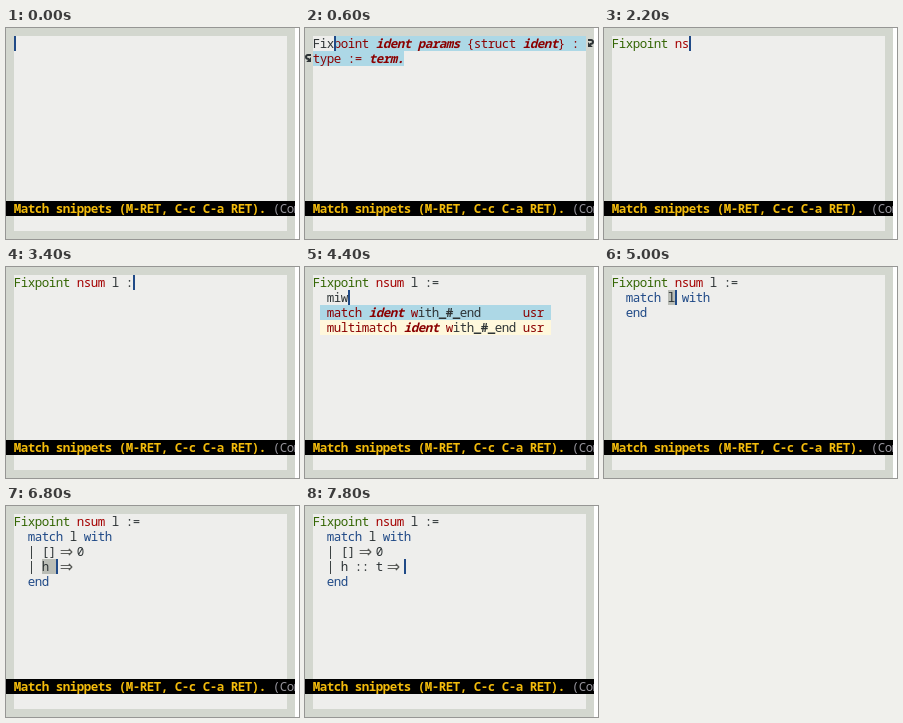
Animation, 293 px wide and 211 px high, one loop 8 s. Source, as an HTML page with a canvas:

```html
<!DOCTYPE html>
<html>
<head>
<meta charset="utf-8">
<style>
html, body { margin: 0; width: 100%; height: 100%; overflow: hidden; background: #fff; }
canvas { display: block; width: 293px; height: 211px; }
</style>
</head>
<body>
<canvas id="stage"></canvas>
<script>
const W = 293, H = 211, CW = 7, LH = 15, PAD = 8, COLS = 39;
const LOOP = 8000, KEY = 200;
const INK = '#2e3436', GREEN = '#346604', RED = '#a40000', BLUE = '#204a87',
      MAROON = '#8b0000', SKY = '#add8e6', CREAM = '#fff8dc', REGION = '#babdb6';
const HEAD = 'Fixpoint nsum l :=';
const HINT = 'Fixpoint ident params {struct ident} : type := term.';

const canvas = document.getElementById('stage');
const ctx = canvas.getContext('2d');
const dpr = window.devicePixelRatio || 1;
canvas.width = Math.round(W * dpr);
canvas.height = Math.round(H * dpr);

const px = col => PAD + col * CW;
const py = row => PAD + row * LH;

function box(x, y, w, h, color) {
  ctx.fillStyle = color;
  ctx.fillRect(x, y, w, h);
}

function cells(col, row, count, color) {
  box(px(col), py(row), count * CW, LH, color);
}

// Text on the terminal grid, one character per cell
function put(text, col, row, color = INK, style = '') {
  ctx.font = style + ' 12.5px "Noto Sans Mono", "DejaVu Sans Mono", monospace';
  ctx.textAlign = 'center';
  ctx.fillStyle = color;
  [...text].forEach((ch, i) => ctx.fillText(ch, px(col + i) + CW / 2, py(row) + 12));
}

function parts(col, row, list) {
  for (const [text, color, style] of list) {
    put(text, col, row, color, style);
    col += text.length;
  }
}

function cursor(col, row) {
  box(px(col), py(row), 2, LH, BLUE);
}

// Line-wrap mark in the fringe
function wrapMark(x, y, flip) {
  ctx.save();
  ctx.translate(flip ? x + 8 : x, y);
  if (flip) ctx.scale(-1, 1);
  ctx.strokeStyle = ctx.fillStyle = INK;
  ctx.lineWidth = 2;
  ctx.beginPath();
  ctx.moveTo(6, 1);
  ctx.lineTo(3, 1);
  ctx.quadraticCurveTo(1, 1.2, 1, 3);
  ctx.quadraticCurveTo(1, 5, 4, 5);
  ctx.stroke();
  ctx.beginPath();
  ctx.moveTo(6, 3);
  ctx.lineTo(6, 8);
  ctx.lineTo(1.2, 8);
  ctx.fill();
  ctx.restore();
}

function preview(from) {
  const slanted = new Set();
  for (const m of HINT.matchAll(/ident|params|term\./g))
    for (let i = 0; i < m[0].length; i++) slanted.add(m.index + i);
  const spot = i => [i % COLS, Math.floor(i / COLS)];
  for (let i = from; i < HINT.length; i++) cells(...spot(i), 1, SKY);
  for (let i = from; i < HINT.length; i++)
    put(HINT[i], ...spot(i), MAROON, slanted.has(i) ? 'italic bold' : '');
  wrapMark(281, 11, true);
  wrapMark(0, 26, false);
}

function popup() {
  ['match', 'multimatch'].forEach((word, i) => {
    const row = 2 + i;
    cells(1, row, 33, i ? CREAM : SKY);
    parts(2, row, [
      [word + ' ', MAROON], ['ident', MAROON, 'italic bold'], [' w', MAROON],
      ['ith', INK], ['_#_', INK, 'bold'], ['end', INK]
    ]);
    put('usr', 30, row, MAROON);
  });
}

function branch(row, pattern, active, body) {
  if (active) cells(4, row, pattern.length, REGION);
  put('| ' + pattern, 2, row);
  const col = 4 + pattern.length;
  ctx.font = '16px "DejaVu Sans", sans-serif';
  ctx.textAlign = 'center';
  ctx.fillStyle = '#555753';
  ctx.fillText('⇒', px(col + 1.5), py(row) + 13);
  put(body, col + 3, row);
}

function header(n) {
  const text = HEAD.slice(0, n);
  put(text.slice(0, 8), 0, 0, n < 8 ? INK : GREEN);
  put(text.slice(9, 13), 9, 0, RED);
  put(text.slice(13), 13, 0);
  if (n >= 3 && n <= 8) preview(n);
  if (n <= HEAD.length) cursor(n, 0);
}

function matchBlock(n) {
  const name = n === 24 ? 'ident' : 'l';
  if (n < 26) cells(8, 1, name.length, REGION);
  parts(2, 1, [['match', BLUE], [' ' + name + ' ', INK], ['with', BLUE]]);
  let row = 2;
  if (n >= 27) branch(row++, n === 27 ? '_' : '[]'.slice(0, n - 27), n < 30, n > 30 ? '0' : '');
  if (n >= 32) branch(row++, n === 32 ? '_' : 'h :: t'.slice(0, n - 32), n < 39, '');
  put('end', 2, row, BLUE);

  if (n < 26) cursor(8 + n - 24, 1);
  else if (n === 26) cursor(5, 2);
  else if (n < 30) cursor(4 + n - 27, 2);
  else if (n < 32) cursor(9 + n - 30, 2);
  else if (n < 39) cursor(4 + n - 32, 3);
  else cursor(13, 3);
}

function caption() {
  box(0, 173, 289, LH, '#000');
  ctx.save();
  ctx.beginPath();
  ctx.rect(0, 173, 289, LH);
  ctx.clip();
  put('Match snippets (M-RET, C-c C-a RET).', 0, 11, '#f4bc0c', 'bold');
  put('(Com', 37, 11, '#96949c');
  ctx.restore();
}

function draw(t) {
  const n = Math.floor(t / KEY);
  ctx.setTransform(dpr, 0, 0, dpr, 0, 0);
  box(0, 0, W, H, '#fff');
  box(0, 0, 289, H, '#d3d7cf');
  box(PAD, PAD, COLS * CW, 195, '#eeeeec');
  header(n);
  if (n >= 24) {
    matchBlock(n);
  } else if (n >= 19) {
    const typed = 'miw'.slice(0, n - 19);
    put(typed, 2, 1);
    cursor(2 + typed.length, 1);
    if (n >= 22) popup();
  }
  caption();
}

const start = performance.now();
function tick() {
  draw((performance.now() - start) % LOOP);
  requestAnimationFrame(tick);
}
tick();
</script>
</body>
</html>
```
